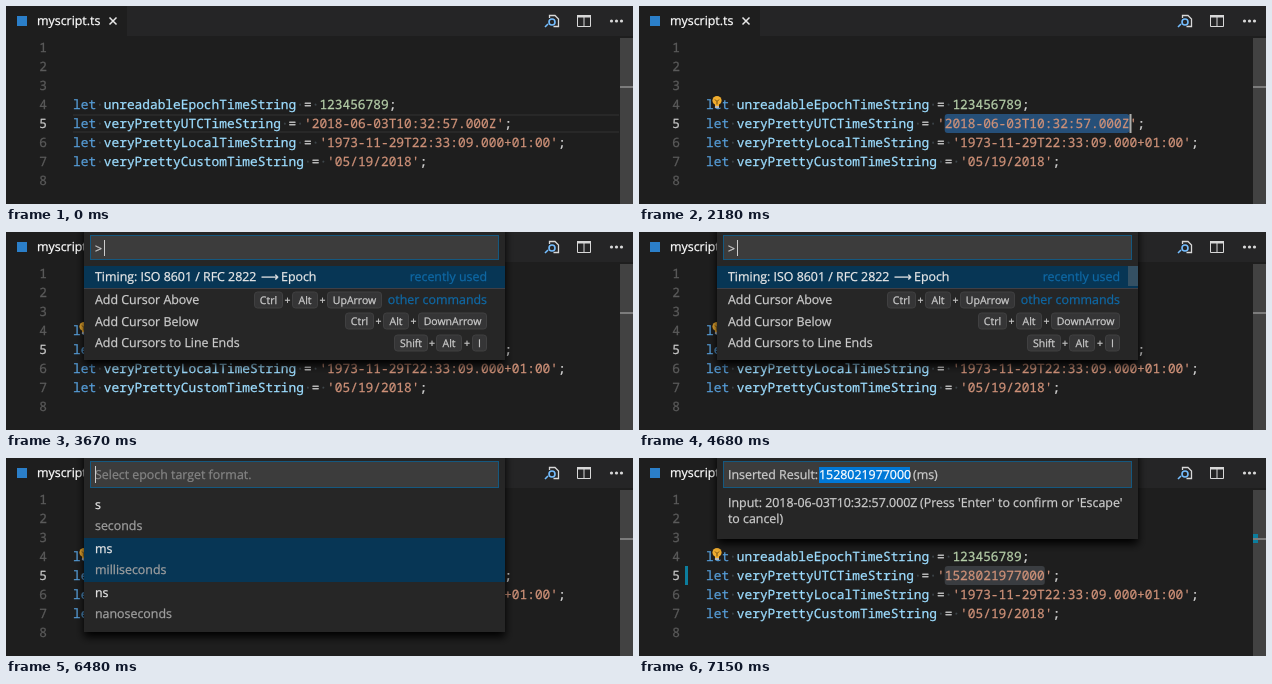
Write an HTML page that moves like this. It is 627x198 px and loops after 9.34 s.

```html
<!DOCTYPE html>
<html lang="en">
<head>
<meta charset="utf-8">
<title>Timestamp conversion in an editor</title>
<style>
html, body { margin: 0; width: 100%; height: 100%; overflow: hidden; background: #1e1e1e; }
svg { display: block; font: 12.4px "Open Sans", "Noto Sans", sans-serif; text-rendering: geometricPrecision; white-space: pre; }
text { fill: currentColor; stroke: currentColor; stroke-width: .25px; }
.code { font: 12.833px "Noto Sans Mono", "DejaVu Sans Mono", monospace; }
.key { font-size: 10.5px; text-anchor: middle; }
.arrow { font-family: "DejaVu Sans", sans-serif; }
.end { text-anchor: end; }
</style>
</head>
<body>
<svg id="stage" width="627" height="198" viewBox="0 0 627 198">
  <defs>
    <filter id="shadow" x="-10%" y="-20%" width="120%" height="150%">
      <feDropShadow dx="0" dy="5" stdDeviation="4" flood-color="#000"/>
    </filter>
  </defs>
  <g id="scene"></g>
</svg>
<script>
const LOOP = 9340, CHAR = 7.7, LEFT = 67, QUOTE = 31;
const UTC = '2018-06-03T10:32:57.000Z', EPOCH = '1528021977000';
const BLUE = '#569cd6', NAME = '#9cdcfe', PLAIN = '#d4d4d4', NUM = '#b5cea8', STR = '#ce9178';
const UI = '#cccccc', BRIGHT = '#e8e8e8', HINT = '#0f69a6', ICON = '#d8d8d8';
const scene = document.getElementById('scene');

const colX = c => LEFT + c * CHAR;
const lineY = n => 32 + (n - 1) * 19;
const within = (t, a, b) => t >= a && t < b;
const rect = (x, y, w, h, fill, extra = '') =>
  `<rect x="${x}" y="${y}" width="${w}" height="${h}" fill="${fill}" ${extra}/>`;
const text = (x, y, s, color = UI, cls = '') =>
  `<text x="${x}" y="${y}" color="${color}" class="${cls}">${s.replace(/>/g, '&gt;')}</text>`;
const path = (d, stroke, width = 1) =>
  `<path d="${d}" fill="none" stroke="${stroke}" stroke-width="${width}"/>`;

// Number of selected characters, growing word by word
const STEPS = [[1080, 4], [1250, 7], [1480, 13], [1650, 16], [1870, 19], [2100, 24]];
const selected = t => STEPS.reduce((n, [at, len]) => t >= at ? len : n, 0);

function statement(n, name, value, color) {
  let col = 0, out = '';
  const y = lineY(n) + 14;
  const put = (s, c) => { out += text(colX(col), y, s, c, 'code'); col += s.length; };
  const space = () => put('·', '#3e464b');
  put('let', BLUE); space();
  put(name, NAME); space();
  put('=', PLAIN); space();
  put(value, color);
  put(';', PLAIN);
  return out;
}

function header() {
  return rect(0, 0, 627, 30, '#252526') + rect(0, 0, 121, 30, '#1e1e1e') +
    rect(11, 10, 10, 10, '#2b7fc9') +
    text(31, 19, 'myscript.ts', '#fff') +
    path('M103.5 11.5l7 7m0-7l-7 7', BRIGHT, 1.5) +
    path('M543.5 12v-2.500h5.500l3.500 3.500v7.500h-5', ICON, 1.3) +
    path('M539 21l3-3M549 16a3 3 0 1 1-6 0a3 3 0 1 1 6 0', '#75beff', 1.6) +
    path('M571.5 10v10.500h13v-10.500M578 10v10', ICON) + rect(571, 9, 14, 2.5, ICON) +
    [605.5, 610.5, 615.5].map(x => `<circle cx="${x}" cy="15" r="1.6" fill="${ICON}"/>`).join('');
}

function editor(t) {
  const done = t >= 6920, n = selected(t);
  let out = '';
  if (!n) out += rect(LEFT, 108, 546, 2, '#282828') + rect(LEFT, 125, 546, 2, '#282828');
  if (within(t, 1080, 1250)) out += rect(colX(40), lineY(7), 4 * CHAR, 19, '#343a40', 'rx="3"');
  if (n) {
    const len = done ? EPOCH.length : n;
    out += rect(colX(QUOTE), 108, len * CHAR, 19, done ? '#3a3d41' : '#264f78', 'rx="3"');
  }
  for (let i = 1; i <= 8; i++) out += text(41, lineY(i) + 14, '' + i, i == 5 ? '#c6c6c6' : '#5a5a5a', 'code end');
  out += statement(4, 'unreadableEpochTimeString', '123456789', NUM) +
    statement(5, 'veryPrettyUTCTimeString', `'${done ? EPOCH : UTC}'`, STR) +
    statement(6, 'veryPrettyLocalTimeString', "'1973-11-29T22:33:09.000+01:00'", STR) +
    statement(7, 'veryPrettyCustomTimeString', "'05/19/2018'", STR);
  if (within(t, 150, 630) || within(t, 1080, 2740) || within(t, 3220, 3670))
    out += rect(Math.round(colX(QUOTE + n)) - .5, 108, 2, 19, '#aeafad');
  if (t >= 2180) out += bulb();
  out += rect(614, 32, 13, 166, '#424242');
  if (t >= 7150) out += rect(46, 108, 3, 19, '#0c7d9d') + rect(614, 76, 5, 9, '#0c7d9d');
  return out + rect(614, 80, 13, 2, '#7c7c7c');
}

function bulb() {
  return '<circle cx="78" cy="95.500" r="6" fill="#1e1e1e"/>' +
    '<circle cx="78" cy="94.500" r="4.600" fill="#f0ad2f"/>' +
    rect(76, 97, 4, 3, '#f0ad2f') + rect(76, 100, 4, 2, '#b9b9b9') +
    path('M76 93.500l2 2l2-2M78 95.500v3', '#6b4c14');
}

function panel(bottom, inputBottom) {
  return rect(78, -10, 421, bottom + 10, '#252526', 'filter="url(#shadow)"') +
    rect(84.5, 3.5, 408, inputBottom - 4, '#3c3c3c', 'stroke="#15587f"');
}

function keys(y, chips) {
  return chips.map(([label, x, w], i) =>
    rect(x + .5, y - 8, w - 1, 16, '#353536', 'stroke="#404041" rx="3"') +
    text(x + w / 2, y + 4, label, UI, 'key') +
    (i ? text((x + chips[i - 1][1] + chips[i - 1][2]) / 2, y + 4, '+', UI, 'key') : '')).join('');
}

function commands(t) {
  let out = panel(128, 28) + rect(78, 34, 421, 22, '#073655') + rect(78, 56, 421, 1, '#3f3f46') +
    text(89, 21, '>') +
    text(89, 49, 'Timing: ISO 8601 / RFC 2822', BRIGHT) + text(255, 49, '⟶', BRIGHT, 'arrow') +
    text(275, 49, 'Epoch', BRIGHT) +
    text(481, 49, 'recently used', HINT, 'end') + text(481, 72, 'other commands', HINT, 'end') +
    ['Add Cursor Above', 'Add Cursor Below', 'Add Cursors to Line Ends'].map((s, i) => text(89, 72 + i * 21.5, s)).join('') +
    keys(68, [['Ctrl', 248, 29], ['Alt', 286, 26], ['UpArrow', 321, 55]]) +
    keys(89, [['Ctrl', 339, 29], ['Alt', 377, 26], ['DownArrow', 412, 69]]) +
    keys(111, [['Shift', 388, 34], ['Alt', 430, 26], ['I', 466, 15]]);
  if (t >= 4070) out += rect(489, 34, 10, 20, '#797979', `opacity="${t < 4150 ? .2 : .4}"`);
  if (t < 4150 || t >= 4680) out += rect(98, 8, 1, 16, UI);
  return out;
}

function formats(t) {
  const pick = t < 6480 ? 0 : 1;
  let out = panel(174, 30) + rect(78, 36 + pick * 44, 421, 44, '#073655') +
    text(89, 21, 'Select epoch target format.', '#848484');
  [['s', 'seconds'], ['ms', 'milliseconds'], ['ns', 'nanoseconds']].forEach(([unit, name], i) => {
    out += text(89, 51 + i * 44, unit, BRIGHT) + text(89, 72 + i * 44, name, '#a0a0a0');
  });
  if (within(t, 4990, 5540) || within(t, 6020, 6560)) out += rect(89, 8, 1, 17, UI);
  return out;
}

function result() {
  return panel(81, 30) + rect(180, 9, 91, 16, '#0078d7') +
    text(89, 21, 'Inserted Result:') + text(180, 21, EPOCH, '#fff') + text(274, 21, '(ms)') +
    text(89, 49, 'Input: ' + UTC) + text(281, 49, "(Press 'Enter' to confirm or 'Escape'") +
    text(89, 65, 'to cancel)');
}

function overlay(t) {
  if (within(t, 3670, 4990)) return commands(t);
  if (within(t, 4990, 6920)) return formats(t);
  return t >= 7000 ? result() : '';
}

let last = '';
function draw(now) {
  const t = now % LOOP;
  const markup = header() + editor(t) + overlay(t);
  if (markup !== last) scene.innerHTML = last = markup;
  requestAnimationFrame(draw);
}
draw(performance.now());
</script>
</body>
</html>
```
